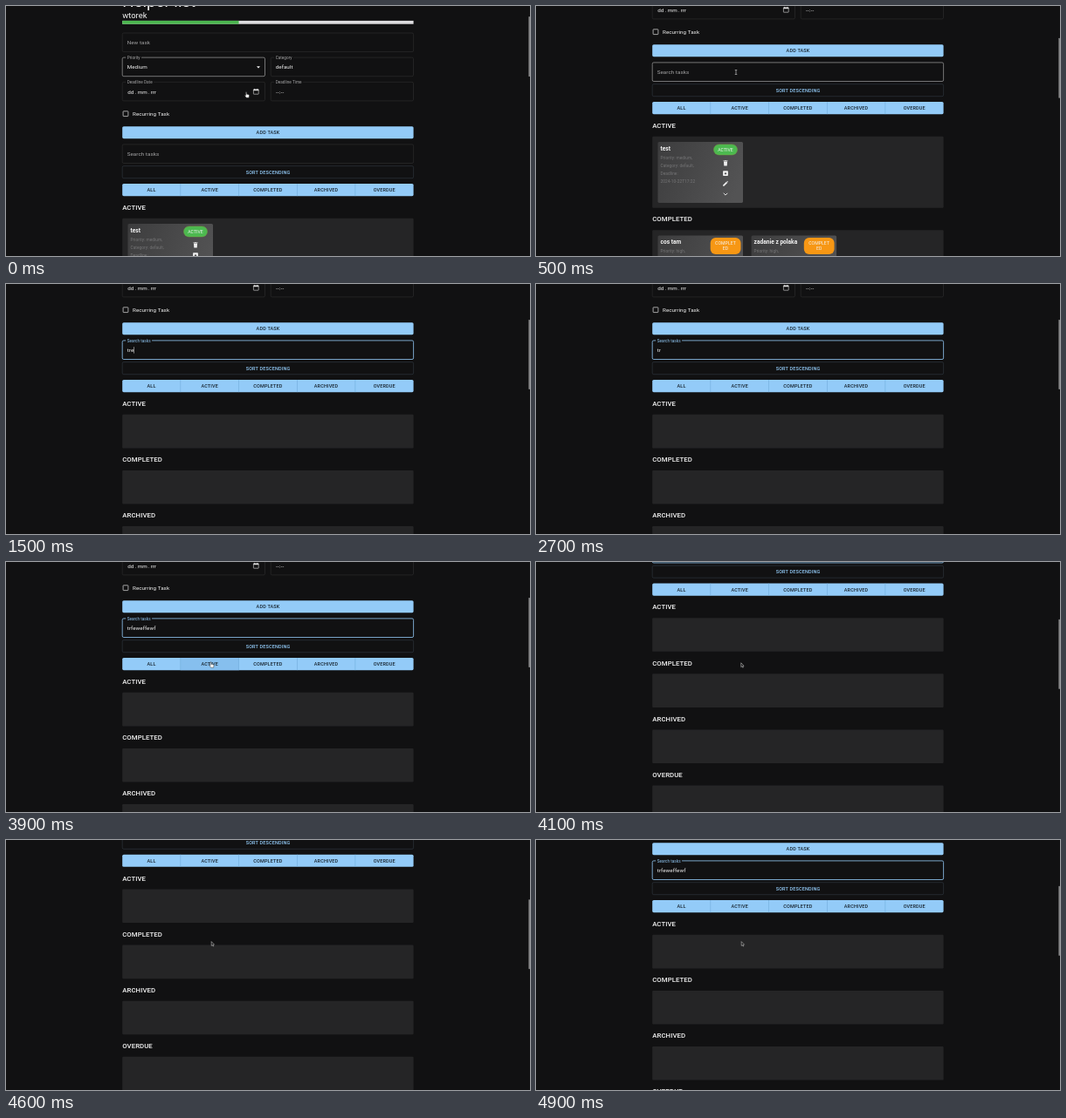
An HTML page with a canvas that plays this animation: 600 px wide and 287 px high, repeating every 5 s.

```html
<!DOCTYPE html>
<html lang="pl">
<head>
<meta charset="utf-8">
<title>Task list</title>
<style>
html, body { margin: 0; width: 100%; height: 100%; overflow: hidden; background: #111112; }
canvas { display: block; width: 600px; height: 287px; }
</style>
</head>
<body>
<canvas id="stage"></canvas>
<script>
const W = 600, H = 287, LOOP = 5000, STEP = 100;
const LEFT = 133.2, RIGHT = 466.6, FULL = RIGHT - LEFT;
const BG = '#111112', BLUE = '#93cbf8', WHITE = '#f4f4f4', GREY = '#a5a5a6', EDGE = '#363637';

const canvas = document.getElementById('stage');
const ctx = canvas.getContext('2d');
const dpr = window.devicePixelRatio || 1;
canvas.width = W * dpr;
canvas.height = H * dpr;

// Time, search text, caret visible
const typing = [
  [0, '', 0], [800, '', 1], [1000, 't', 1], [1300, 't', 0],
  [1500, 'tre', 1], [1600, 'trefw', 1], [1700, 'trefwe', 1],
  [2000, 'trefwe', 0], [2200, 'trefw', 1], [2300, 'tref', 1],
  [2600, 'tre', 1], [2700, 'tr', 0],
  [3000, 'trf', 1], [3100, 'trfe', 1], [3200, 'trfewe', 1],
  [3300, 'trfeweff', 1], [3400, 'trfeweffew', 1], [3500, 'trfeweffewf', 1],
  [3800, 'trfeweffewf', 0], [4300, 'trfeweffewf', 1], [4600, 'trfeweffewf', 0],
  [4800, 'trfeweffewf', 1], [4900, 'trfeweffewf', 0]
];
const scrolling = [[0, 0], [500, 94], [3900, 94], [4400, 337], [4700, 135]];
const mouseX = [[0, 276], [500, 229], [3500, 229], [3900, 235.5], [4700, 236]];
const mouseY = [[0, 102], [500, 76], [3500, 76], [3900, 118], [4700, 119]];

function ease(keys, t) {
  let i = 0;
  while (i < keys.length - 1 && keys[i + 1][0] <= t) i++;
  const [t0, a] = keys[i];
  if (i === keys.length - 1) return a;
  const [t1, b] = keys[i + 1];
  const k = (t - t0) / (t1 - t0);
  return a + (b - a) * k * k * (3 - 2 * k);
}

function current(keys, t) {
  return keys.filter(k => k[0] <= t).pop();
}

// y is the middle of the capital letters
function text(str, x, y, size, color, opt = {}) {
  ctx.font = `${opt.weight || 400} ${size}px Roboto, "Open Sans", sans-serif`;
  ctx.letterSpacing = (opt.spacing || 0) * size + 'px';
  ctx.textAlign = opt.align || 'left';
  ctx.fillStyle = color;
  ctx.fillText(str, x, y + size * 0.355);
}

function box(x, y, w, h, r, fill, stroke, line = 0.5) {
  ctx.beginPath();
  ctx.roundRect(x, y, w, h, r);
  if (fill) { ctx.fillStyle = fill; ctx.fill(); }
  if (stroke) { ctx.strokeStyle = stroke; ctx.lineWidth = line; ctx.stroke(); }
}

function shape(points, fill, stroke, line = 0.5) {
  ctx.beginPath();
  points.forEach(([x, y]) => ctx.lineTo(x, y));
  if (fill) { ctx.closePath(); ctx.fillStyle = fill; ctx.fill(); }
  if (stroke) { ctx.strokeStyle = stroke; ctx.lineWidth = line; ctx.stroke(); }
}

function at(x, y, draw) {
  ctx.save();
  ctx.translate(x, y);
  draw();
  ctx.restore();
}

function label(str, x, y, color) {
  ctx.font = '400 4.7px Roboto, "Open Sans", sans-serif';
  ctx.letterSpacing = '0px';
  ctx.fillStyle = BG;
  ctx.fillRect(x - 1.5, y - 2, ctx.measureText(str).width + 3, 4);
  text(str, x, y, 4.7, color);
}

function field(x, y, w, name, value, edge = EDGE) {
  box(x, y, w, 21.6, 1.6, null, edge);
  if (name) label(name, x + 5.5, y, GREY);
  if (value) text(value, x + 5.5, y + 11, 6.25, name ? WHITE : GREY, { spacing: 0.009 });
}

function button(str, y, filled) {
  box(LEFT, y, FULL, 14, 1.6, filled ? BLUE : null, filled ? null : '#38434c');
  text(str, 300, y + 7.1, 5.47, filled ? '#18242e' : BLUE, { weight: 500, spacing: 0.0286, align: 'center' });
}

function heading(str, y) {
  text(str, LEFT, y, 7.8, WHITE, { weight: 500, spacing: 0.0075 });
}

function calendar(x, y) {
  box(x - 2.9, y - 2.5, 5.8, 5.4, 0.4, null, '#ddd', 0.6);
  ctx.fillStyle = '#ddd';
  ctx.fillRect(x - 2.9, y - 2.6, 5.8, 1.5);
  ctx.fillRect(x - 2, y - 3.4, 0.7, 1);
  ctx.fillRect(x + 1.3, y - 3.4, 0.7, 1);
}

function form(t) {
  const half = 163.3, right = 303.2;
  text('Helper list', LEFT, -5.2, 18.7, WHITE);
  text('wtorek', LEFT, 10.9, 9.38, WHITE);
  ctx.fillStyle = '#dddcdf';
  ctx.fillRect(LEFT, 16.9, FULL, 3.8);
  ctx.fillStyle = '#4bb64f';
  ctx.fillRect(LEFT, 16.9, FULL * 0.4, 3.8);

  field(LEFT, 31, FULL, '', 'New task');
  field(LEFT, 59.1, half, 'Priority', 'Medium', t < 100 ? '#d8d8d8' : EDGE);
  shape([[287, 69.3], [291, 69.3], [289, 71.4]], WHITE);
  field(right, 59.1, half, 'Category', 'default');
  field(LEFT, 87.3, half, 'Deadline Date', '');
  [['dd', 139.3], ['.', 147.7], ['mm', 150.8], ['.', 162.4], ['rrr', 165.8]]
    .forEach(([s, x]) => text(s, x, 98.3, 6.25, WHITE));
  calendar(286.3, 98.3);
  field(right, 87.3, half, 'Deadline Time', '');
  text('--:--', 309, 98.3, 6.25, WHITE, { spacing: 0.03 });

  box(134.1, 120.8, 5.8, 5.8, 0.5, null, '#c8c8c8', 0.8);
  text('Recurring Task', 145, 123.8, 6.25, WHITE, { spacing: 0.009 });
  button('ADD TASK', 138.2, true);
}

function search(t, value, caret) {
  const y = 158.9, mid = y + 11;
  const focus = Math.max(0, Math.min(1, (t - 600) / 200));
  const hover = t >= 400 && t < 700;
  box(LEFT, y, FULL, 21.6, 1.6, null, focus ? BLUE : hover ? '#d8d8d8' : EDGE, focus ? 0.8 : 0.5);
  if (focus === 1) label('Search tasks', 138.7, y, BLUE);
  else text('Search tasks', 138.7, mid - 11 * focus, 6.25 - 1.55 * focus, focus ? BLUE : GREY, { spacing: 0.009 });
  text(value, 138.7, mid, 6.25, WHITE, { spacing: 0.009 });
  if (caret) {
    const end = 138.7 + ctx.measureText(value).width;
    ctx.fillStyle = WHITE;
    ctx.fillRect(end, mid - 3.7, 0.5, 7.4);
  }
}

function filters(hovered) {
  const w = FULL / 5;
  box(LEFT, 204, FULL, 14.2, 1.6, BLUE);
  ['ALL', 'ACTIVE', 'COMPLETED', 'ARCHIVED', 'OVERDUE'].forEach((name, i) => {
    const x = LEFT + i * w;
    if (i === 1 && hovered) {
      ctx.fillStyle = '#86bfee';
      ctx.fillRect(x, 204, w, 14.2);
    }
    if (i) {
      ctx.fillStyle = '#6ba6d4';
      ctx.fillRect(x - 0.25, 204, 0.5, 14.2);
    }
    text(name, x + w / 2, 211.2, 5.47, '#18242e', { weight: 500, spacing: 0.0286, align: 'center' });
  });
}

function cardIcons() {
  const c = '#f0f0f0';
  at(0, 24.5, () => {
    shape([[-2, -1.8], [2, -1.8], [1.7, 3], [-1.7, 3]], c);
    ctx.fillRect(-2.6, -2.9, 5.2, 0.7);
    ctx.fillRect(-1, -3.4, 2, 0.6);
  });
  at(0, 36.2, () => {
    box(-2.9, -2.9, 5.8, 5.8, 0.7, c);
    shape([[-1.5, 0], [-0.5, 0], [-0.5, -1.1], [0.5, -1.1], [0.5, 0], [1.5, 0], [0, 1.6]], '#4a4a4b');
  });
  at(0, 48, () => {
    shape([[-2.9, 2.9], [-2.9, 1.6], [1, -2.2], [2.2, -1], [-1.6, 2.9]], c);
    shape([[1.4, -2.6], [2, -3.1], [3.1, -2], [2.6, -1.4]], c);
  });
  at(0, 60, () => shape([[-2.3, -1.1], [0, 1.2], [2.3, -1.1]], null, c, 0.9));
}

function card(x, y, title, lines, done) {
  at(x, y, () => {
    const shade = ctx.createLinearGradient(0, 0, 97.5, 40);
    shade.addColorStop(0, '#3d3d3e');
    shade.addColorStop(1, '#535354');
    box(0, 0, 97.5, 70, 1.6, shade);
    text(title, 3, 7.6, 6.6, WHITE, { weight: 700 });
    lines.forEach((s, i) => text(s, 3, 18 + i * 9.25, 4.8, '#757576', { spacing: 0.01 }));
    const small = { align: 'center', spacing: 0.02 };
    if (done) {
      box(60.2, 2.5, 34.8, 19, 6, '#f79714');
      text('COMPLET', 77.5, 9.2, 5.1, WHITE, small);
      text('ED', 77.5, 15.1, 5.1, WHITE, small);
    } else {
      box(64, 3, 27, 12, 6, '#4cb950', '#75a63f');
      text('ACTIVE', 77.5, 9.2, 5.1, WHITE, small);
    }
    at(77.5, done ? 7 : 0, cardIcons);
  });
}

function lists(value) {
  const full = value.length < 2;
  let y = 231.2;
  ['ACTIVE', 'COMPLETED', 'ARCHIVED', 'OVERDUE'].forEach((name, i) => {
    const filled = full && i < 2;
    const h = filled ? 82 : 38.6;
    heading(name, y);
    box(LEFT, y + 12.6, FULL, h, 1.2, '#252526');
    if (filled) {
      const top = y + 18.7;
      if (i === 0) card(139.5, top, 'test', ['Priority: medium,', 'Category: default,', 'Deadline:', '2024-10-22T17:22']);
      else {
        const high = ['Priority: high,', 'Category: default,', 'Deadline:'];
        card(139.5, top, 'cos tam', high, true);
        if (!value) card(246.6, top, 'zadanie z polaka', high, true);
      }
    }
    y += h + 25.5;
  });
  return y;
}

function stats(y) {
  button('RESET PROGRESS', y - 12.4, false);
  text('Task Statistics', LEFT, y + 8, 7.8, WHITE, { weight: 700 });
  let from = 0;
  [[0.2, '#0c88f8'], [0.4, '#1bdc9f'], [0.4, '#f27743']].forEach(([part, color]) => {
    const to = from - part * Math.PI * 2;
    ctx.beginPath();
    ctx.moveTo(299.8, y + 75.6);
    ctx.arc(299.8, y + 75.6, 31.4, from, to, true);
    ctx.closePath();
    ctx.fillStyle = color;
    ctx.fill();
    ctx.strokeStyle = '#f2f2f2';
    ctx.lineWidth = 0.5;
    ctx.stroke();
    from = to;
  });
}

function scrollbar(scroll, full) {
  const [ratio, h] = full ? [0.262, 69] : [0.292, 80];
  box(598.4, (scroll + 46) * ratio, 1.6, h, 0.6, '#858586');
}

function pointer(t) {
  if (t >= 1000 && t < 3600) return;
  at(ease(mouseX, t), ease(mouseY, t), () => {
    if (t < 300 || t === 3900) {
      shape([[-1.4, -3.2], [-0.5, -3.2], [-0.3, -0.7], [2, -0.2], [2.5, 0.4],
        [2.2, 3.2], [-0.9, 3.2], [-2.6, 0.7], [-2, 0.2], [-1.3, 0.8]], '#fff', '#111', 0.4);
    } else if (t < 1000 || t === 3600) {
      ctx.fillStyle = '#ddd';
      ctx.fillRect(-0.3, -2.8, 0.6, 5.6);
      ctx.fillRect(-1.3, -3, 2.6, 0.5);
      ctx.fillRect(-1.3, 2.5, 2.6, 0.5);
    } else {
      shape([[-0.8, -2.4], [-0.8, 2.4], [0.3, 1.5], [1.1, 3.1], [1.8, 2.8],
        [1.1, 1.2], [2.5, 1.1]], '#111', '#ddd', 0.5);
    }
  });
}

function draw(now) {
  const t = Math.floor((now % LOOP) / STEP) * STEP;
  const scroll = ease(scrolling, t);
  const [, value, caret] = current(typing, t);
  ctx.setTransform(dpr, 0, 0, dpr, 0, 0);
  ctx.fillStyle = BG;
  ctx.fillRect(0, 0, W, H);
  at(0, -scroll, () => {
    form(t);
    search(t, value, caret);
    button('SORT DESCENDING', 183.7, false);
    filters(t === 3900);
    stats(lists(value));
  });
  scrollbar(scroll, value.length < 2);
  pointer(t);
}

const start = performance.now();
function tick() {
  draw(performance.now() - start);
  requestAnimationFrame(tick);
}
tick();
</script>
</body>
</html>
```
